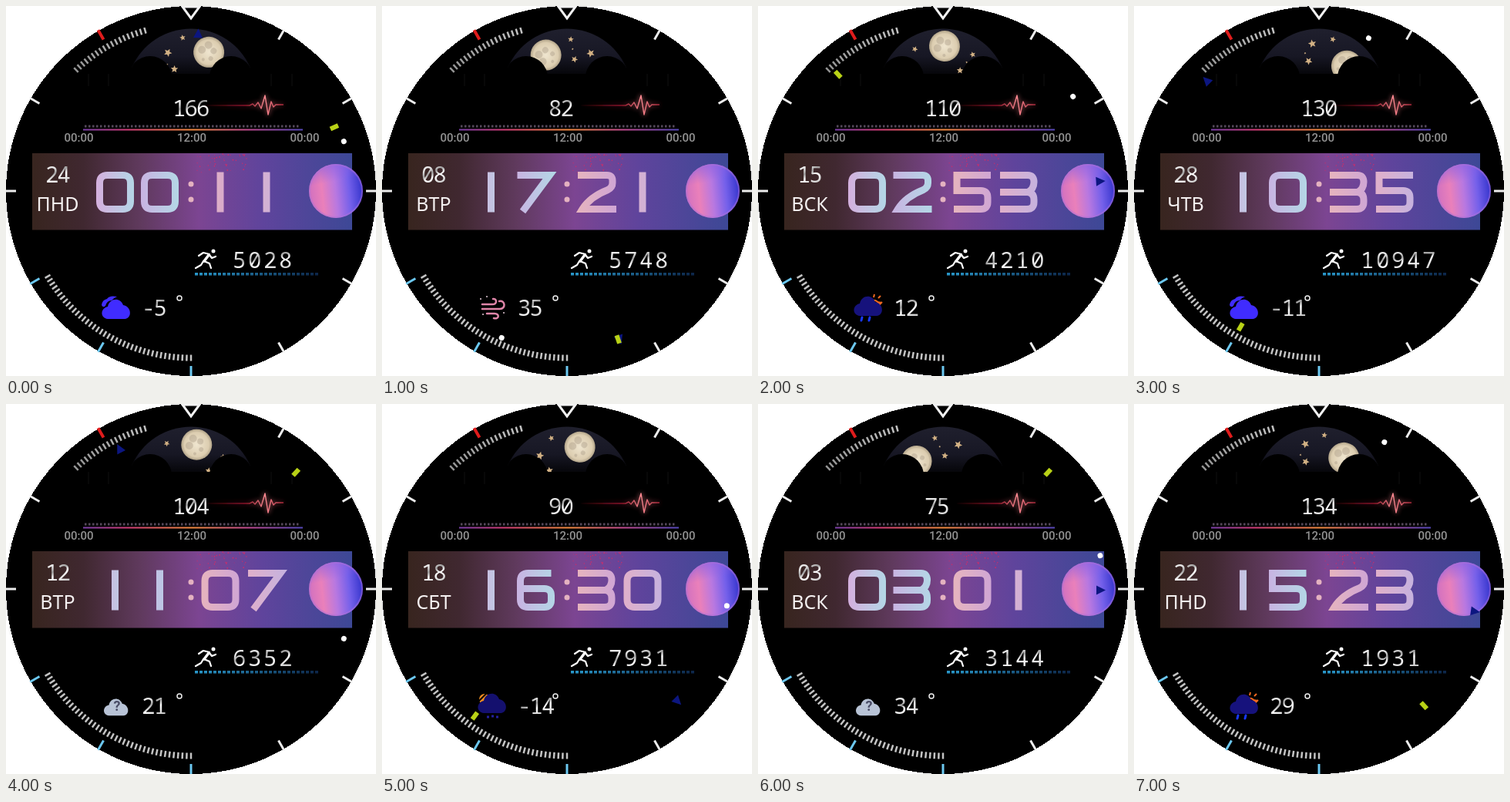
These frames come from a looping animation (480 px wide and 480 px high, 8 s). An HTML page:

```html
<!DOCTYPE html>
<html lang="uk">
<head>
<meta charset="utf-8">
<style>
html, body { margin: 0; width: 100%; height: 100%; overflow: hidden; background: #fff }
svg { display: block; width: 480px; height: 480px }
.num { font: 500 29px "Noto Sans Mono", monospace; letter-spacing: -1.9px; fill: url(#metal) }
#steps { letter-spacing: 2.6px }
.scale { font: 500 15px Roboto, sans-serif; fill: #929292; text-anchor: middle }
#day { font: 25px "Noto Sans", sans-serif; fill: #f4f0f0; text-anchor: middle }
#clock path { fill: none; stroke-width: 9 }
</style>
</head>
<body>
<svg viewBox="0 0 480 480">
<defs>
  <linearGradient id="metal" x2=".4" y2="1">
    <stop stop-color="#fff"/><stop offset=".4" stop-color="#e4e4e4"/>
    <stop offset=".55" stop-color="#a0a0a0"/><stop offset=".7" stop-color="#fff"/><stop offset="1" stop-color="#ccc"/>
  </linearGradient>
  <linearGradient id="band">
    <stop stop-color="#38251f"/><stop offset=".16" stop-color="#402830"/><stop offset=".34" stop-color="#603a5e"/>
    <stop offset=".52" stop-color="#7c4592"/><stop offset=".72" stop-color="#5f449c"/><stop offset="1" stop-color="#3d4896"/>
  </linearGradient>
  <linearGradient id="rainbow">
    <stop stop-color="#7a3fa8"/><stop offset=".2" stop-color="#d03c78"/><stop offset=".5" stop-color="#f08a40"/>
    <stop offset=".75" stop-color="#c04a90"/><stop offset="1" stop-color="#5548b8"/>
  </linearGradient>
  <linearGradient id="pulse" gradientUnits="userSpaceOnUse" x1="255" x2="362">
    <stop stop-color="#a01828" stop-opacity="0"/><stop offset=".55" stop-color="#901a2c"/>
    <stop offset=".76" stop-color="#ff8c94"/><stop offset="1" stop-color="#a01c30"/>
  </linearGradient>
  <linearGradient id="sky" x2="0" y2="1"><stop stop-color="#20202e"/><stop offset=".6" stop-color="#171724"/><stop offset="1" stop-color="#050508"/></linearGradient>
  <radialGradient id="moonFill"><stop stop-color="#efe5cf"/><stop offset=".8" stop-color="#dccdb0"/><stop offset="1" stop-color="#b0a288"/></radialGradient>
  <linearGradient id="ball" x1="0" y1=".6" x2="1" y2=".5">
    <stop stop-color="#d070c0"/><stop offset=".25" stop-color="#ea80ba"/><stop offset=".5" stop-color="#b878e0"/>
    <stop offset=".75" stop-color="#7460ea"/><stop offset="1" stop-color="#3434cc"/>
  </linearGradient>
  <linearGradient id="ballTop" x2=".2" y2="1"><stop stop-color="#8a60e0" stop-opacity=".8"/><stop offset=".4" stop-color="#8a60e0" stop-opacity="0"/></linearGradient>
  <filter id="glow" x="-20%" y="-100%" width="140%" height="300%"><feGaussianBlur stdDeviation="3"/></filter>
  <clipPath id="dome"><path d="M163 80A84 84 0 0 1 317 80V88H163Z"/></clipPath>
  <path id="cloud" d="M132 406C122 405 122 392 132 390C134 379 148 377 152 388C163 390 164 405 154 406Z"/>
</defs>

<circle cx="240" cy="240" r="240" shape-rendering="crispEdges"/>
<path d="M107 88v16M133 88v16M344 88v16M371 88v16" stroke="#101010"/>

<g clip-path="url(#dome)">
  <rect x="160" y="28" width="160" height="62" fill="url(#sky)"/>
  <g id="sky-disc">
    <circle cy="-38" r="20" fill="url(#moonFill)"/>
    <g fill="#a89a86" opacity=".4">
      <circle cx="-6" cy="-45" r="5"/><circle cx="4" cy="-43" r="4"/><circle cx="-9" cy="-35" r="5"/>
      <circle cx="7" cy="-33" r="3"/><circle cx="0" cy="-26" r="2"/>
    </g>
    <g id="stars" fill="#d2b184"></g>
  </g>
  <circle cx="187" cy="93" r="28"/><circle cx="292" cy="93" r="28"/>
</g>

<g id="ring"></g>
<path d="M229 1H251L240 16Z" fill="none" stroke="#f2f2f2" stroke-width="3"/>

<text id="heart" class="num" x="216" y="143"/>
<g fill="none" stroke-linejoin="round">
  <path id="beat" d="M258 129H316L320 127L323 130L327 125L331 133L336 116L340 141L344 124L347 131L350 128H360" stroke="url(#pulse)" stroke-width="1.4"/>
  <use href="#beat" filter="url(#glow)" opacity=".9"/>
  <path d="M102 156H381" stroke="#55485a" stroke-width="3" stroke-dasharray="2.5 2.5"/>
</g>
<rect x="100" y="159.500" width="285" height="2" fill="url(#rainbow)"/>
<g class="scale"><text x="94.500" y="176">00:00</text><text x="241" y="176">12:00</text><text x="387.500" y="176">00:00</text></g>

<rect x="34" y="191" width="415" height="99.500" fill="url(#band)"/>
<g id="specks" fill="#d02c68"></g>
<text id="date" class="num" x="51" y="229"/>
<text id="day" x="67" y="266"/>
<g id="clock"></g>
<g fill="#e4b2c0"><circle cx="240" cy="231" r="3.500"/><circle cx="240" cy="251" r="3.500"/></g>
<g id="sphere">
  <circle cy="240" r="35" fill="url(#ball)"/><circle cy="240" r="35" fill="url(#ballTop)"/>
  <circle cy="240" r="34" fill="none" stroke="#b070d8" stroke-width="2" opacity=".5"/>
</g>

<g fill="none" stroke="#fff" stroke-width="2.200" stroke-linecap="round" stroke-linejoin="round">
  <path d="M250 324L256 320L264 322L257 331L264 334L266 340M256 331L253 336L246 340M264 323L267 327L272 325"/>
  <path d="M263 323L257 331" stroke-width="3.500"/><circle cx="269" cy="318" r="1.400"/>
</g>
<text id="steps" class="num" x="294" y="340"/>
<g id="dashes"></g>

<g id="weather">
  <g id="cloudy" fill="#402cff"><use href="#cloud"/><path d="M124 388Q125 381 131 380Q134 375 144 377Q139 379 137 382Q131 382 129 389Q126 392 124 388Z"/></g>
  <g id="wind" fill="none" stroke="#df85a8" stroke-width="2.500" stroke-linecap="round">
    <path d="M130 387H143C150 387 149 379 144 380M130 393H153C161 393 160 381 152 383M136 399H146C153 399 152 407 145 405"/>
    <path d="M128 380h.1M136 377h.1M158 398h.1M131 400h.1" stroke="#d8c0cc" stroke-width="2"/>
  </g>
  <g id="sleet"><circle cx="133" cy="383" r="7" fill="#f08c20"/><path d="M125 386L136 375" stroke="#000" stroke-width="2"/><use href="#cloud" y="-5" fill="#14106e"/><path d="M136 406h3M142 405h3M148 406h3" stroke="#2420a0" stroke-width="3"/></g>
  <g id="unknown"><use href="#cloud" transform="translate(20 55) scale(.86)" fill="#b8c3d6"/><text x="144" y="398" text-anchor="middle" font-family="Roboto, sans-serif" font-weight="700" font-size="18" fill="#4b4e68">?</text></g>
  <g id="rain"><path d="M148 382A7 7 0 0 1 157 388L161 384M150 378L151 374M156 379L159 376" fill="#f06820" stroke="#f06820" stroke-width="2"/><use href="#cloud" y="-4" fill="#16127c"/><path d="M135 404l-1 4M145 404l-1 4" stroke="#1838ff" stroke-width="3" stroke-linecap="round"/></g>
</g>
<text id="temp" class="num" x="176" y="402"/>
<circle cx="225" cy="379" r="3" fill="none" stroke="#eee" stroke-width="1.500"/>

<path id="hour" d="M-6 -199L0 -211L6 -199Z" fill="#0c1680"/>
<rect id="minute" x="-3" y="-209" width="6" height="11" fill="#b9d216"/>
<circle id="second" cy="-208.500" r="3.500" fill="#fff"/>
</svg>
<script>
const $ = id => document.getElementById(id);
const add = (parent, tag, attrs) => {
  const node = document.createElementNS('http://www.w3.org/2000/svg', tag);
  for (const key in attrs) node.setAttribute(key, attrs[key]);
  return parent.appendChild(node);
};

// Dial ticks
const tick = (angle, from, to, color, width) => add($('ring'), 'path', {
  d: `M0 ${-from}V${-to}`, stroke: color, 'stroke-width': width, transform: `translate(240 240) rotate(${angle})`
});
for (let h = 1; h < 12; h++)
  tick(h * 30, 227, 241, h == 11 ? '#e01c1c' : h > 5 && h < 9 ? '#6cc8f0' : '#ececec', h == 11 ? 4 : 3);
for (let i = 0; i < 41; i++) tick(180 + i * 1.48, 212.5, 220.5, '#c4c4c4', 2.5);
for (let i = 0; i < 19; i++) tick(-43.5 + i * 1.53, 212.5, 220.5, `hsl(0 0% ${58 + i}%)`, 2.5);

// Step progress
for (let x = 245; x < 406; x += 6) {
  const k = (x - 245) / 162;
  add($('dashes'), 'rect', {x, y: 346, width: 4, height: 3.5, fill: `rgb(${40 - 28 * k} ${150 - 115 * k} ${200 - 130 * k})`});
}

// Stars: radius, angle from the moon, size
for (const [r, angle, size] of [[42, -83, 5.5], [23, -107, 5], [50, -50, 4], [42, 93, 5.5], [23, 71, 4.5], [47, 52, 4], [34, -103, 1.5], [35, 58, 1.5]]) {
  let d = '';
  for (let i = 0; i < 10; i++) {
    const a = i * Math.PI / 5, s = i % 2 ? size * .45 : size;
    d += `${i ? 'L' : 'M'}${s * Math.sin(a)} ${-s * Math.cos(a)}`;
  }
  add($('stars'), 'path', {d: d + 'Z', transform: `rotate(${angle}) translate(0 ${-r})`});
}

// Pink dust on the band
let seed = 7;
const random = () => (seed = seed * 16807 % 2147483647) / 2147483647;
for (let i = 0; i < 45; i++)
  add($('specks'), 'circle', {cx: 248 + random() * 68, cy: 192 + random() ** 1.5 * 24, r: .4 + random() * .5});

// Large digits
const digits = {
  0: 'M10 0H30Q40 0 40 10V34Q40 44 30 44H10Q0 44 0 34V10Q0 0 10 0Z',
  1: 'M20 -4V48',
  2: 'M-4 0H34Q41 0 41 7V10Q41 16 35 19Q12 28 2 44H46',
  3: 'M-4 0H32Q40 0 40 9T32 22H-4M32 22Q40 23 40 32V35Q40 44 31 44H-4',
  5: 'M44 0H0V20H31Q40 20 40 29V35Q40 44 31 44H-4',
  6: 'M40 0H10Q0 0 0 10V34Q0 44 10 44H31Q40 44 40 35V29Q40 20 31 20H0',
  7: 'M-4 0H38L3 47'
};
const cells = [[121.5, '#d4b0de', '#b4d6e6'], [179.5, '#c8b4e2', '#b4d6e6'], [258, '#e6b4be', '#d0a6d4'], [318, '#e0b0ca', '#c6b2de']]
  .map(([x, from, to], i) => {
    const gradient = add(document.querySelector('defs'), 'linearGradient',
      {id: 'cell' + i, gradientUnits: 'userSpaceOnUse', x1: -4, x2: 44});
    add(gradient, 'stop', {'stop-color': from});
    add(gradient, 'stop', {offset: 1, 'stop-color': to});
    return add($('clock'), 'path', {transform: `translate(${x} 219.5)`, stroke: `url(#cell${i})`});
  });

// time, date, day, heart, steps, temp, weather, moon, hour, minute, second, sphere x
const states = [
  ['0011', '24', 'ПНD', 166, 5028, -5, 'cloudy', 37.5, 2.6, 66, 72, 428],
  ['1721', '08', 'ВТР', 82, 5748, 35, 'wind', -46, 160.5, 161, 204, 429],
  ['0253', '15', 'ВСК', 110, 4210, 12, 'rain', 3, 86.5, 318, 54, 428],
  ['1035', '28', 'ЧТВ', 130, 10947, -11, 'cloudy', 71, 314.5, 210, 18, 428],
  ['1107', '12', 'ВТР', 104, 6352, 21, 'unknown', 11, 333, 42, 108, 428],
  ['1630', '18', 'СБТ', 90, 7931, -14, 'sleet', 26, 135.4, 216, 96, 429],
  ['0301', '03', 'ВСК', 75, 3144, 34, 'unknown', -65, 90.4, 42, 78, 429],
  ['1523', '22', 'ПНD', 134, 1931, 29, 'rain', 58, 98.2, 138, 24, 428]
];

const turn = (id, angle, y = 240) => $(id).setAttribute('transform', `translate(240 ${y}) rotate(${angle})`);

function show([time, date, day, heart, steps, temp, weather, moon, hour, minute, second, sphere]) {
  cells.forEach((cell, i) => cell.setAttribute('d', digits[time[i]]));
  Object.entries({date, day, heart, steps, temp}).forEach(([id, value]) => $(id).textContent = value);
  for (const icon of $('weather').children) icon.style.display = icon.id == weather ? '' : 'none';
  turn('sky-disc', moon, 90);
  turn('hour', hour);
  turn('minute', minute);
  turn('second', second);
  $('sphere').setAttribute('transform', `translate(${sphere})`);
}

let current = -1;
function frame() {
  const index = Math.floor(performance.now() / 1000) % states.length;
  if (index != current) show(states[current = index]);
  requestAnimationFrame(frame);
}
frame();
</script>
</body>
</html>
```
